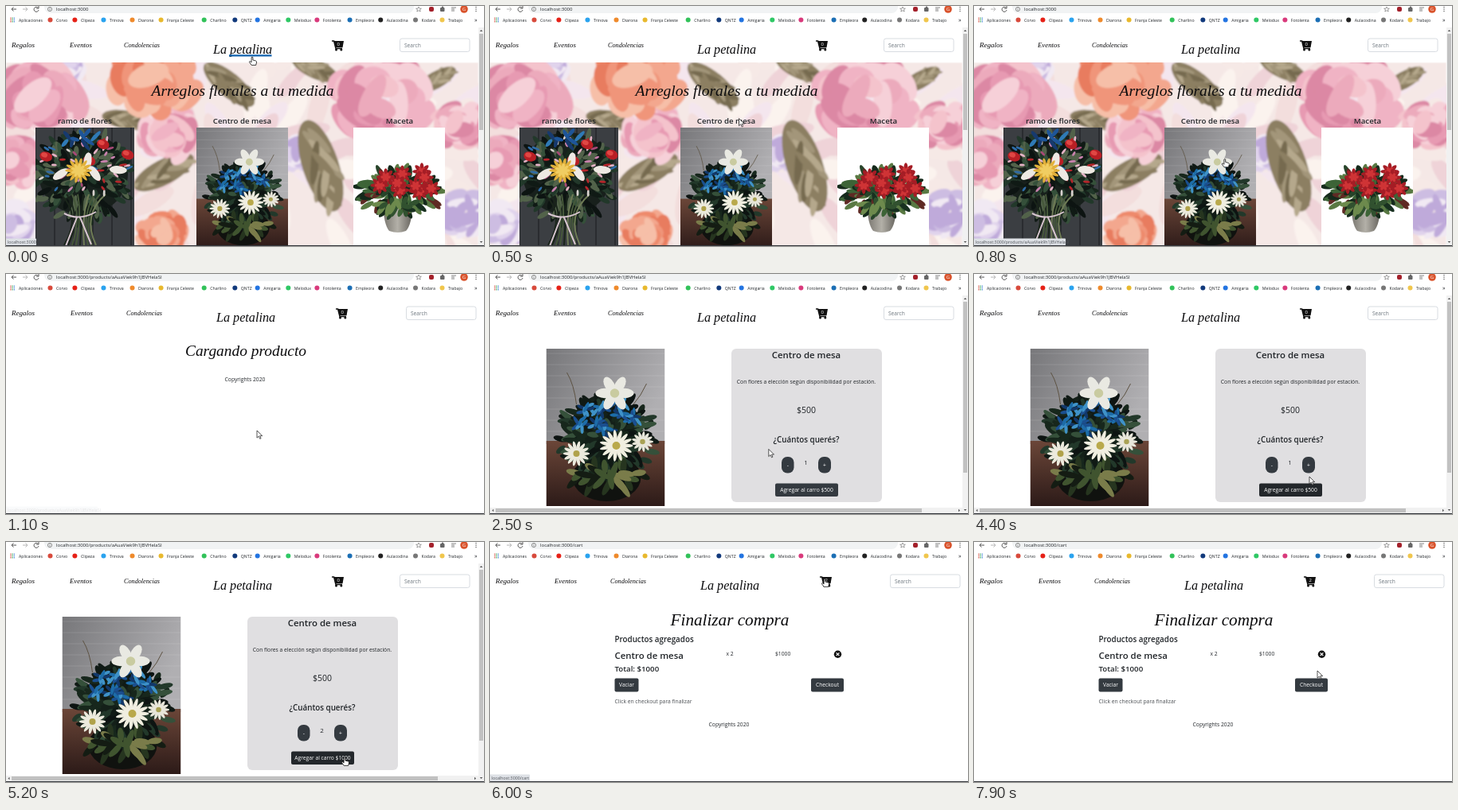
An HTML page that plays this animation: 600x302 px, repeating every 8 s.

```html
<!DOCTYPE html>
<html lang="es">
<head>
<meta charset="utf-8">
<title>Tienda de flores</title>
<style>
html, body { margin: 0; width: 100%; height: 100%; overflow: hidden; background: #fff }
body > svg { display: block; width: 600px; height: 302px }
text { font-family: "Open Sans", "Noto Sans", sans-serif; fill: #212529; white-space: pre }
.script { font-family: "Liberation Serif", "Noto Serif", serif; font-style: italic; fill: #0c0c0e }
.b { font-weight: 600 }
.mid { text-anchor: middle }
</style>
</head>
<body>
<svg viewBox="0 0 600 302">
  <defs>
    <filter id="soft" x="0" y="0" width="1" height="1"><feGaussianBlur stdDeviation="1.3"/></filter>
    <linearGradient id="wall" x2="1" y2=".4"><stop stop-color="#77777a"/><stop offset="1" stop-color="#b0afb2"/></linearGradient>
    <linearGradient id="wood" x2="0" y2="1"><stop stop-color="#6b4638"/><stop offset="1" stop-color="#2c1a18"/></linearGradient>
    <linearGradient id="pot"><stop stop-color="#77746d"/><stop offset=".5" stop-color="#b3b0a8"/><stop offset="1" stop-color="#66635d"/></linearGradient>
  </defs>
  <g id="page"></g>
  <path id="arrow" d="M0 0V9.2L2.2 7.2 3.7 10.4 5.1 9.8 3.7 6.7H6.7Z" fill="#fff" stroke="#111" stroke-width=".7"/>
  <path id="hand" d="M-.9 .6Q0-.4 .9 .6V4L4.6 5Q5.8 5.4 5.5 7L4.7 10.4H-.8L-3.5 6.7Q-3.7 5.4-2.4 5.7L-.9 6.8Z" fill="#fff" stroke="#111" stroke-width=".8"/>
</svg>
<script>
const $ = id => document.getElementById(id);
let seed = 41;
const rnd = () => (seed = seed * 16807 % 2147483647) / 2147483647;
const pick = list => list[Math.floor(rnd() * list.length)];
const times = (n, fn) => Array.from({length: n}, (_, i) => fn(i)).join('');

// Basic marks
const text = (x, y, size, str, cls = '', fill) =>
  `<text x="${x}" y="${y}" font-size="${size}" class="${cls}"${fill ? ` style="fill:${fill}"` : ''}>${str}</text>`;
const rect = (x, y, w, h, fill, r = 0, extra = '') =>
  `<rect x="${x}" y="${y}" width="${w}" height="${h}" rx="${r}" fill="${fill}" ${extra}/>`;
const dot = (x, y, r, fill) => `<circle cx="${x}" cy="${y}" r="${r}" fill="${fill}"/>`;
const oval = (x, y, rx, ry, a, fill) =>
  `<ellipse rx="${rx}" ry="${ry}" fill="${fill}" transform="translate(${x} ${y}) rotate(${a})"/>`;
const line = (d, color, w = 1) => `<path d="${d}" fill="none" stroke="${color}" stroke-width="${w}"/>`;
const frame = (x, y, w, h, body) => `<svg x="${x}" y="${y}" width="${w}" height="${h}">${body}</svg>`;

// Plants: everything is spread over an oval on a golden-angle spiral, rim first
const around = (n, cx, cy, rx, ry, fn) => times(n, i => {
  const a = i * 2.4 + rnd() * .6, d = Math.sqrt(1 - i / n);
  return fn(cx + Math.cos(a) * d * rx, cy + Math.sin(a) * d * ry, a * 57.3);
});
const scatter = (n, cx, cy, rx, ry, size, colors) => around(n, cx, cy, rx, ry, (x, y, a) =>
  oval(x, y, size * (.7 + rnd() * .6), size * .36, a + rnd() * 70 - 35, pick(colors)));
const bloom = (x, y, r, n, color, core) => times(n, i => {
  const a = i * 6.283 / n;
  return oval(x + Math.cos(a) * r * .55, y + Math.sin(a) * r * .5, r * .5, r * 1.5 / n + .4, a * 57.3, color);
}) + dot(x, y, r * .25, core || color);
const rose = (x, y, r, colors) => around(26, x, y, r * .75, r * .6, (px, py, a) =>
  oval(px, py, r * (.2 + rnd() * .25), r * (.12 + rnd() * .14), a + 60 + rnd() * 60, pick(colors)));
const leaf = (x, y, l, a) => `<g transform="translate(${x} ${y}) rotate(${a})">`
  + oval(0, 0, l, l * .38, 0, OLIVE[0])
  + around(16, 0, 0, l * .75, l * .25, (px, py) => oval(px, py, l * .35, l * .08, py > 0 ? 25 : -25, pick(OLIVE))) + '</g>';

const GREENS = ['#17271c', '#22382a', '#101a15', '#35503a', '#0d1412'];
const PINK = ['#f0b3c4', '#e79ab2', '#f6d0d8', '#ecaabc', '#f4c3cc', '#dc88a4'];
const CORAL = ['#f0957a', '#e87c5e', '#f6bfa8', '#ee8a6c', '#f3a78e'];
const LILAC = ['#e0d3ec', '#cdbde2', '#f1e9f3', '#bfaada'];
const PALE = ['#f6e9e6', '#f3dedd', '#fbf3ee', '#efd3d8', '#f4e6ee'];
const OLIVE = ['#8c7f62', '#a3967a', '#766a50', '#b5a88c'];

const wallpaper = frame(0, 71, 593, 231, '<g filter="url(#soft)">' + rect(0, 0, 593, 231, '#f5e8e6')
  + scatter(150, 296, 115, 390, 160, 32, PALE)
  + [[75, 5, 30], [10, 205, 40], [368, 115, 34], [575, 190, 45]].map(p => rose(...p, LILAC)).join('')
  + [[280, 28, 40, 40], [150, 72, 30, 10], [198, 138, 42, -28], [395, 130, 60, 72], [388, 8, 32, 25], [540, 22, 28, -30]]
      .map(p => leaf(...p)).join('')
  + [[42, 45, 66], [12, 125, 45], [205, 90, 45], [470, 45, 75], [568, 78, 42]].map(p => rose(...p, PINK)).join('')
  + rose(185, 22, 66, CORAL) + rose(195, 215, 38, CORAL) + '</g>');

const BLUES = ['#1d6ca8', '#1b4f8f', '#3f92c8', '#12386a'];
const centerpiece = rect(0, 0, 149, 120, 'url(#wall)')
  + times(8, i => line(`M0 ${6 + i * 14}H149`, '#ffffff1c', 1.2)) + rect(0, 116, 149, 82, 'url(#wood)')
  + oval(76, 162, 43, 30, 0, '#10120f') + oval(75, 105, 45, 48, 0, '#142019')
  + line('M38 70Q35 45 26 30M108 72Q120 58 126 44', '#5d5242')
  + scatter(130, 76, 112, 60, 56, 10, GREENS) + scatter(26, 76, 160, 46, 18, 11, ['#40542f', '#26351f', '#7a7c4a', '#141c13'])
  + around(8, 72, 84, 36, 22, (x, y) => scatter(8, x, y, 9, 7, 6, BLUES))
  + bloom(86, 56, 23, 6, '#e9e9e2', '#c9cba0')
  + bloom(88, 122, 20, 15, '#f0eee0', '#b9a94b') + bloom(121, 117, 13, 13, '#e8e6da', '#a9a255') + bloom(38, 132, 16, 14, '#eceadd', '#b0a24a');

const bouquet = rect(0, 0, 124, 149, '#3b3e42') + times(6, i => line(`M${i * 24} 0V149`, '#2a2c30', 2))
  + oval(60, 58, 56, 52, 0, '#18201c') + scatter(150, 60, 62, 62, 56, 9, GREENS.concat('#52624a'))
  + times(9, i => line(`M${32 + i * 7} 84Q58 110 ${36 + i * 5} 148`, pick(['#46583a', '#1a251a', '#6e7b55']), 2))
  + scatter(50, 60, 48, 58, 40, 4, ['#c982ae', '#a84a77', '#e5b3c6', '#2f6ca8', '#d8d2cf', '#b5262b'])
  + scatter(10, 58, 14, 28, 9, 7, ['#1e5598', '#2f7ab6', '#173a6e'])
  + around(4, 60, 32, 56, 20, (x, y) => oval(x, y, 8, 6, 20, '#b91f25') + oval(x - 2, y - 2, 4, 3, 20, '#e04744'))
  + around(4, 62, 52, 42, 14, (x, y, a) => oval(x, y, 11, 5, a, '#eee9e3'))
  + bloom(54, 54, 16, 14, '#e2b13b') + bloom(54, 54, 9, 9, '#f0cd62')
  + line('M36 108Q55 118 76 106M52 113L38 149M56 113L70 147', '#d7c5cf', 2);

const planter = rect(0, 0, 115, 149, '#fff') + '<path d="M37 94H74Q74 122 66 130Q56 134 45 130Q38 122 37 94Z" fill="url(#pot)"/>'
  + scatter(100, 57, 80, 52, 28, 9, ['#27442a', '#3d6437', '#152a1b', '#597943', '#5f2a24'])
  + around(10, 66, 68, 36, 18, (x, y) => bloom(x, y, 11, 8, '#a51d25', '#e2b04a') + bloom(x, y, 6, 6, '#cf3436'))
  + scatter(16, 56, 98, 28, 9, 9, ['#31512f', '#183020', '#6d8a4d']);

// Browser chrome
const BOOKMARKS = {
  Corvo: '#d84a3c', Clipeza: '#e62117', Trinova: '#2aa3ef', Diarona: '#ef8a2c', 'Franja Celeste': '#e8b92e',
  Charlino: '#32c25a', QNTZ: '#123a7c', Amigaria: '#2374e1', Melodux: '#2fc865', Fotolenta: '#d93a7c',
  Empleora: '#1c6fb5', Aulacodina: '#222', Kodara: '#777', Trabajo: '#f0c64d'};
let tabX = 55;
const bookmarks = Object.entries(BOOKMARKS).map(([name, color]) => {
  const x = tabX;
  tabX += 18 + name.length * 2.58;
  return dot(x + .5, 17.5, 3, color) + text(x + 8, 19.5, 5.2, name);
}).join('');
const chrome = path => rect(0, 0, 600, 26, '#fff') + rect(48, -8, 464, 17, '#f1f3f4', 8)
  + line('M13 4H7M9.5 1.5L7 4L9.5 6.5', '#555') + line('M21 4H27M24.5 1.5L27 4L24.5 6.5', '#b5b5b5')
  + line('M40.5 2.5A3 3 0 1 0 41 5M41 0V3H38', '#555')
  + '<circle cx="55" cy="4" r="2.6" fill="none" stroke="#666" stroke-width=".7"/>' + line('M55 3.5V5.5M55 2.2V2.9', '#666', .7)
  + text(63, 6, 6, 'localhost:3000' + path)
  + line('M518 1L519 3.2H521.4L519.5 4.7 520.2 7 518 5.7 515.8 7 516.5 4.7 514.6 3.2H517Z', '#666', .6)
  + rect(531, 1, 6, 6, '#a3202a', 2) + rect(545, 2, 5.5, 5, '#666', 1) + dot(548, 1.8, 1.3, '#666')
  + line('M559 2H565M559 4H563M559 6H563', '#666', .8) + dot(575, 4, 4.8, '#d9532c') + text(575, 6.2, 6, 'G', 'mid', '#fff')
  + times(3, i => dot(590, 1.5 + i * 2.5, .7, '#555'))
  + times(9, i => dot(6 + i % 3 * 2.2, 15.3 + Math.floor(i / 3) * 2.2, .8, ['#d9493c', '#3aa757', '#4285d8'][i % 3]))
  + text(16, 19.5, 5.2, 'Aplicaciones') + bookmarks + text(588, 20, 7, '»');

const cartIcon = (x, n) => line(`M${x} 44H${x + 2.6}L${x + 5} 53.4H${x + 13}`, '#111', 1.5)
  + `<path d="M${x + 2.6} 44H${x + 15}L${x + 13.5} 52.2H${x + 4.4}Z" fill="#111"/>`
  + dot(x + 5.5, 55, 1.5, '#111') + dot(x + 11.8, 55, 1.5, '#111') + text(x + 8.2, 50.4, 6, n, 'mid', '#fff');
const nav = (wide, count) => rect(0, 26, 600, 45.5, '#fff')
  + text(7, 52, 9, 'Regalos', 'script') + text(wide ? 81 : 80, 52, 8.8, 'Eventos', 'script')
  + text(wide ? 151 : 148, 52, 8.2, 'Condolencias', 'script')
  + text(wide ? 301 : 297, 60, 16.2, 'La petalina', 'script mid') + cartIcon(wide ? 414 : 409, count)
  + rect(wide ? 502.5 : 494.5, 41, 87.5, 16.5, '#fff', 2.5, 'stroke="#ced4da" stroke-width=".8"')
  + text(wide ? 508 : 500, 51.8, 6.6, 'Search', '', '#6c757d');
const vbar = end => rect(593, 27, 7, 275, '#f1f1f1') + rect(594, 35, 5, end - 35, '#c1c1c1')
  + '<path d="M594.7 32L596.5 30 598.3 32Z M594.7 296L596.5 298 598.3 296Z" fill="#555"/>';
const status = (path, w, fade = 1) => `<g opacity="${fade}">` + rect(-1, 292.5, w + 1, 9, '#dee1e6', 1)
  + text(2, 298.7, 5.3, 'localhost:3000' + path, '', '#50545a') + '</g>';
const button = ([x, y, w, h], str, fill = '#343a40', r = 2) =>
  rect(x, y, w, h, fill, r) + text(x + w / 2, y + h / 2 + 2.4, 6.7, str, 'mid', '#fff');
const copyrights = y => text(300, y, 6.75, 'Copyrights 2020', 'mid');

// Pointer stops: time, x, y
const STOPS = [[0, 309, 64], [900, 315, 197], [2200, 315, 197], [3000, 425, 271], [3900, 425, 271], [4400, 421, 255],
  [4600, 420, 240], [4900, 420, 240], [5200, 425, 271], [5400, 425, 271], [5700, 420, 46], [6600, 420, 46],
  [7300, 434, 176], [7900, 431, 162], [8000, 431, 162]];
const pointer = t => {
  const i = STOPS.findIndex(s => s[0] > t), [t0, x0, y0] = STOPS[i - 1], [t1, x1, y1] = STOPS[i];
  const k = (t - t0) / (t1 - t0), e = k * k * (3 - 2 * k);
  return [x0 + (x1 - x0) * e, y0 + (y1 - y0) * e];
};

// Clickable boxes: x, y, width, height
const TITLE = [260, 40, 76, 27], PHOTO = [239, 153, 115, 149], CART = [408, 42, 22, 16];
const MINUS = [366, 230, 15.5, 20.5], PLUS = [412, 230, 16, 20.5], ADD = [358, 263.5, 79, 16.5];
const EMPTY = [156.5, 171.5, 30, 17], CHECKOUT = [403, 171.5, 41, 17];
const over = (t, [x, y, w, h]) => {
  const [px, py] = pointer(t);
  return px >= x && px <= x + w && py >= y && py <= y + h;
};

// Pages
const PATH = '/products/aAuaViek9h1JBVHelaSI';
const home = t => chrome('') + nav(false, 0) + wallpaper
  + text(297, 113, 19.5, 'Arreglos florales a tu medida', 'script mid')
  + text(99, 148, 9.7, 'ramo de flores', 'b mid') + text(296.5, 148, 9.7, 'Centro de mesa', 'b mid') + text(494, 148, 9.7, 'Maceta', 'b mid')
  + frame(37, 153, 124, 149, bouquet) + frame(436, 153, 115, 149, planter)
  + frame(...PHOTO, `<g transform="scale(.772)">${centerpiece}</g>`) + vbar(156)
  + (over(t, TITLE) ? rect(280, 61.2, 53.5, 2.3, '#1565b0') + status('', 38) : '')
  + (over(t, PHOTO) ? status(PATH, 115) : '');

const loading = t => chrome(PATH) + nav(true, 0) + text(301, 103, 19.4, 'Cargando producto', 'script mid') + copyrights(134.5)
  + (t < 1200 ? status(PATH, 115, .15) : '');

const product = t => {
  const n = t < 4700 ? 1 : 2, dark = over(t, ADD) || t > 3400 && t < 4700;
  return chrome(PATH) + nav(false, t < 5400 ? 0 : 2) + frame(70.5, 94, 149, 198, centerpiece)
    + rect(303, 94, 189, 193, '#e0dfe1', 6) + text(397, 106, 11.4, 'Centro de mesa', 'b mid')
    + text(397, 138, 6.75, 'Con flores a elección según disponibilidad por estación.', 'mid')
    + text(397, 175, 10.5, '$500', 'mid') + text(397, 212, 9.8, '¿Cuántos querés?', 'b mid')
    + button(MINUS, '-', '#343a40', 7) + text(396.5, 240, 8, n, 'mid') + button(PLUS, '+', '#343a40', 7)
    + button(ADD, 'Agregar al carro $' + n * 500, dark ? '#23272b' : '#343a40')
    + vbar(250) + rect(0, 294, 593, 7, '#f1f1f1') + rect(7, 295, 535, 5, '#c1c1c1')
    + '<path d="M4.5 295.7L2.5 297.5 4.5 299.3Z M588 295.7L590 297.5 588 299.3Z" fill="#555"/>'
    + (over(t, CART) ? status('/cart', 50) : '');
};

const cart = t => chrome('/cart') + nav(true, 2) + text(301, 105, 21.2, 'Finalizar compra', 'script mid')
  + text(156.5, 126, 9.8, 'Productos agregados', 'b') + text(156.5, 147, 11.4, 'Centro de mesa', 'b')
  + text(296.5, 143, 6.75, 'x 2') + text(358, 143, 6.75, '$1000')
  + dot(436.5, 141.3, 4.7, '#111') + line('M434.6 139.4L438.4 143.2M438.4 139.4L434.6 143.2', '#fff', 1.2)
  + text(156.5, 163, 9.7, 'Total: $1000', 'b') + button(EMPTY, 'Vaciar') + button(CHECKOUT, 'Checkout')
  + text(156.5, 203, 6.75, 'Click en checkout para finalizar', '', '#4a4e52') + copyrights(231.5)
  + (over(t, CART) ? status('/cart', 50) : '');

const viewAt = t => t < 1000 ? [home, TITLE, PHOTO] : t < 2200 ? [loading]
  : t < 5800 ? [product, MINUS, PLUS, ADD, CART] : [cart, EMPTY, CHECKOUT, CART];

let shown = -1, last = '';
function draw(now) {
  const t = Math.floor(now % 8000 / 100) * 100;
  if (t !== shown) {
    shown = t;
    const [view, ...links] = viewAt(t);
    const html = rect(0, 0, 600, 302, '#fff') + view(t) + rect(0, 301, 600, 1, '#34373c');
    if (html !== last) $('page').innerHTML = last = html;
    const linked = links.some(box => over(t, box));
    for (const id of ['arrow', 'hand']) {
      $(id).setAttribute('transform', `translate(${pointer(t)})`);
      $(id).style.display = (id === 'hand') === linked ? '' : 'none';
    }
  }
  requestAnimationFrame(draw);
}
draw(0);
</script>
</body>
</html>
```
